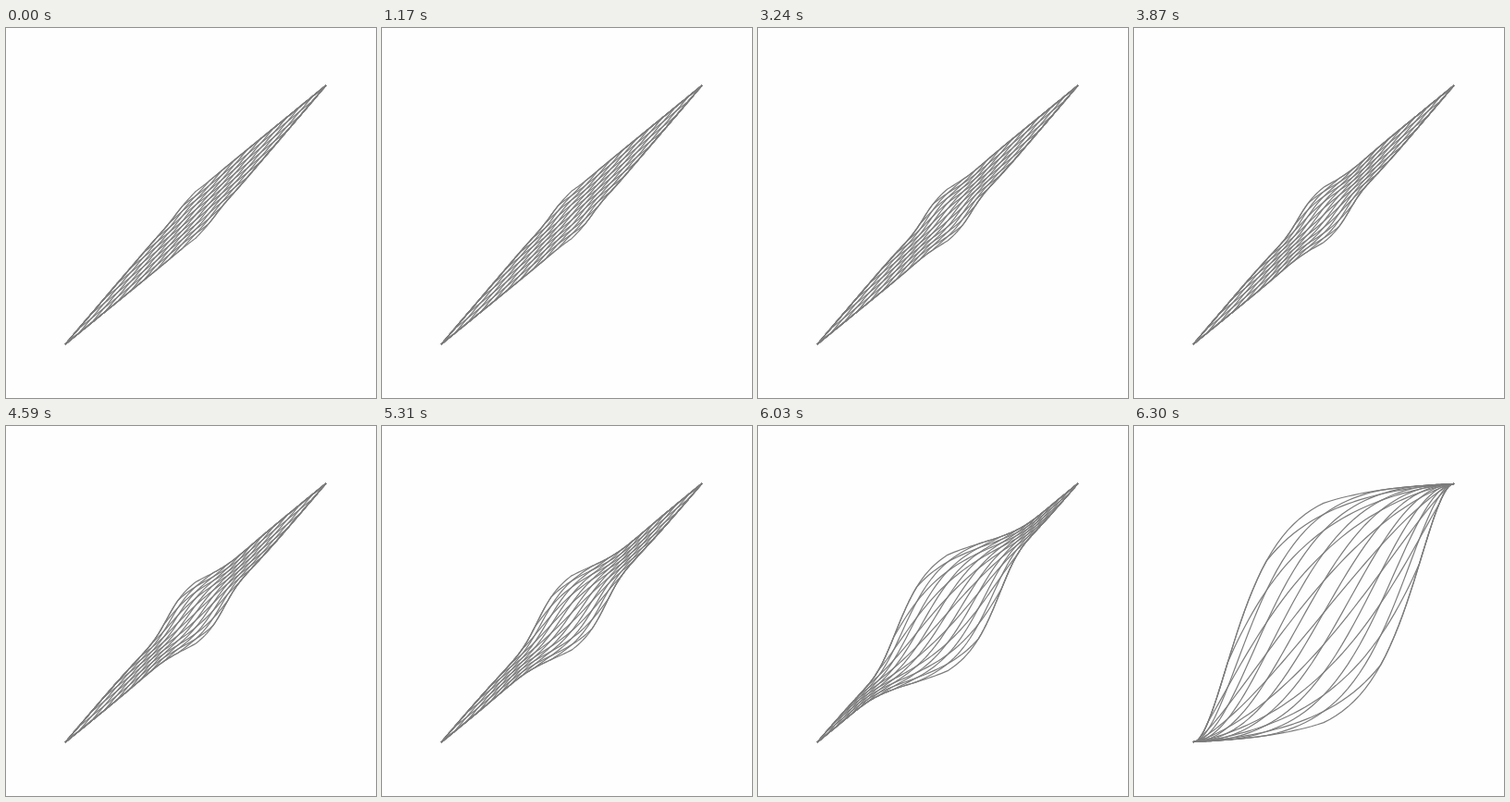
Recreate the animation shown at these times as an HTML page with a canvas. Size 400 by 400 pixels, loop 8 s.

```html
<!DOCTYPE html>
<html lang="en">
<head>
<meta charset="utf-8">
<title>Unfolding strands</title>
<style>
  html, body { margin: 0; width: 100%; height: 100%; overflow: hidden; background: #fefefe; }
  canvas { display: block; }
</style>
</head>
<body>
<canvas id="stage" width="400" height="400"></canvas>
<script>
const ctx = document.getElementById('stage').getContext('2d');
const LOOP = 8000, STEP = 90, STEPS = 70;
const CENTER_X = 205, CENTER_Y = 202, HALF_W = 141, HALF_H = 140;
const STRANDS = 20, RISE = 25;

// Triangle wave with period 2, 1 at even and 0 at odd integers.
const triangle = p => 1 - Math.abs(p - 2 * Math.round(p / 2));

// Pushes a coordinate away from the centre; the ends stay put.
function magnify(value, half, softness, amount, reach) {
  const push = half * Math.tanh(value / softness) - value;
  return value + amount * push * Math.exp(-((value / reach) ** 2));
}

function draw(time) {
  const step = Math.min(STEPS, Math.max(1, Math.floor(time / STEP)));
  const left = STEPS + 1 - step;
  const amount = left ** -0.6 * Math.exp((1 - left) / 45);
  const reach = 700 * left ** -0.85;

  ctx.fillStyle = '#fefefe';
  ctx.fillRect(0, 0, 400, 400);
  ctx.strokeStyle = '#7c7c7c';
  ctx.lineWidth = 1.2;
  ctx.lineJoin = 'round';
  for (let i = 0; i < STRANDS; i++) {
    const shift = 2 * i / STRANDS;
    ctx.beginPath();
    for (let k = -100; k <= 100; k++) {
      const u = k / 100;
      const x = HALF_W * u;
      const y = HALF_H * u + RISE * (triangle(u + shift) - triangle(shift - 1));
      ctx.lineTo(
        CENTER_X + magnify(x, HALF_W, 30, amount, reach),
        CENTER_Y - magnify(y, HALF_H, 20, amount, reach)
      );
    }
    ctx.stroke();
  }
}

function tick() {
  draw(performance.now() % LOOP);
  requestAnimationFrame(tick);
}
tick();
</script>
</body>
</html>
```
